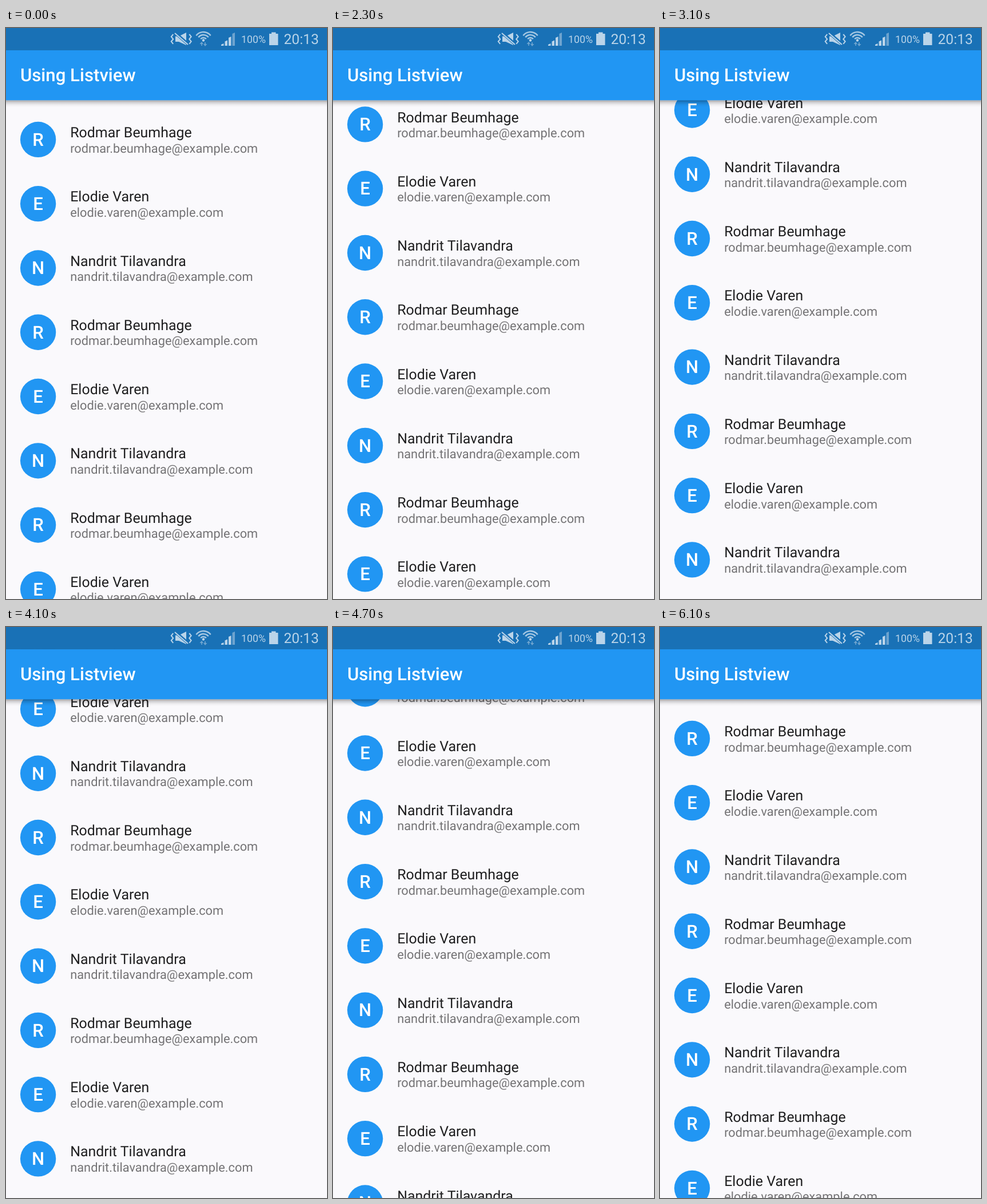
An HTML page with a canvas that plays this animation: 561x998 px, repeating every 6300 ms.

```html
<!DOCTYPE html>
<html lang="en">
<head>
<meta charset="utf-8">
<title>Using Listview</title>
<style>
html, body { margin: 0; width: 100%; height: 100%; overflow: hidden; background: #faf9fc; }
canvas { display: block; }
</style>
</head>
<body>
<canvas id="stage" width="561" height="998"></canvas>
<script>
const W = 561, H = 998, LOOP = 6300, STEP = 100;
// The screen is 360 x 640 dp
const DX = W / 360, DY = H / 640;
const ROW = 72 * DY, FIRST = 125 * DY, BAR_TOP = 25 * DY, BAR_BOTTOM = 81 * DY;
const END = 105 * DY;
const BLUE = '#2196f3', STATUS = '#1971b6', ICON = '#bad4e9', DIM = '#6ea4cf';
const people = ['Rodmar Beumhage', 'Elodie Varen', 'Nandrit Tilavandra'];
const rows = Array.from({ length: 9 }, (_, i) => people[i % people.length]);

// [time, scroll offset], linear in between
const keys = [
  [0, 0], [2200, 0], [2300, 26.5], [2700, 121], [2900, END],
  [4300, END], [4700, 86.7], [5000, 26], [5200, 0], [LOOP, 0]
];

const ctx = document.getElementById('stage').getContext('2d');
ctx.textRendering = 'geometricPrecision';

function scrollAt(t) {
  const i = keys.findIndex(k => k[0] > t);
  const [t0, s0] = keys[i - 1], [t1, s1] = keys[i];
  return s0 + (s1 - s0) * (t - t0) / (t1 - t0);
}

function rect(x, y, w, h, color) {
  ctx.fillStyle = color;
  ctx.fillRect(x, y, w, h);
}

function text(str, x, y, size, color, weight = 400, align = 'left') {
  ctx.font = `${weight} ${size}px Roboto, sans-serif`;
  ctx.textAlign = align;
  ctx.fillStyle = color;
  ctx.fillText(str, x, y);
}

function shape(points, color) {
  ctx.fillStyle = color;
  ctx.beginPath();
  points.forEach(([x, y]) => ctx.lineTo(x, y));
  ctx.fill();
}

function line(points, color, width) {
  ctx.strokeStyle = color;
  ctx.lineWidth = width;
  ctx.beginPath();
  points.forEach(([x, y]) => ctx.lineTo(x, y));
  ctx.stroke();
}

function drawRow(name, y) {
  ctx.fillStyle = BLUE;
  ctx.beginPath();
  ctx.arc(36 * DX, y, 20 * DX, 0, Math.PI * 2);
  ctx.fill();
  text(name[0], 36 * DX, y + 10.8, 20 * DX, '#fff', 500, 'center');
  text(name, 72 * DX, y - 3.9, 16 * DX, '#1f1f20');
  const mail = name.toLowerCase().replace(' ', '.') + '@example.com';
  text(mail, 72 * DX, y + 22.6, 14 * DX, '#747375');
}

function drawMute() {
  shape([[296, 14.5], [302, 14.5], [315, 8], [315, 30], [302, 24], [296, 24]], ICON);
  line([[294, 7], [319, 29]], STATUS, 5);
  line([[295, 9], [318, 29]], ICON, 2);
  for (const [x, side] of [[290.5, 1], [322, -1]]) {
    const zigzag = [0, 1, 2, 3, 4].map(i => [x + (i % 2 ? -1.7 : 1.7) * side, 11 + i * 4.2]);
    line(zigzag, ICON, 2);
  }
}

function drawWifi() {
  ctx.strokeStyle = '#a5c7e2';
  ctx.lineWidth = 2.5;
  for (const r of [6, 11, 16]) {
    ctx.beginPath();
    ctx.arc(345, 23, r, -Math.PI * 0.79, -Math.PI * 0.21);
    ctx.stroke();
  }
  ctx.fillStyle = ICON;
  ctx.beginPath();
  ctx.arc(345, 21.5, 2.2, 0, Math.PI * 2);
  ctx.fill();
  line([[342, 25], [342, 31]], DIM, 1.7);
  line([[348, 25], [348, 31]], DIM, 1.7);
  shape([[338.5, 28], [342, 24], [345, 28]], DIM);
  shape([[345, 28], [348, 32], [351.5, 28]], DIM);
}

function drawStatus() {
  rect(0, 0, W, BAR_TOP, STATUS);
  drawMute();
  drawWifi();
  [27, 21.5, 15, 8].forEach((top, i) => {
    const x = 376 + i * 6.5;
    shape([[x, top + 2], [x + 4.5, top], [x + 4.5, 31], [x, 31]], i < 3 ? ICON : DIM);
  });
  text('100%', 411, 26, 17.8, ICON);
  rect(464, 7.5, 7.5, 3, ICON);
  rect(460, 10, 15.5, 20, ICON);
  text('20:13', 485.5, 28, 24.6, ICON);
}

function drawBar() {
  const shade = ctx.createLinearGradient(0, BAR_BOTTOM, 0, BAR_BOTTOM + 12);
  shade.addColorStop(0, 'rgba(0,0,0,0.34)');
  shade.addColorStop(0.3, 'rgba(0,0,0,0.17)');
  shade.addColorStop(0.65, 'rgba(0,0,0,0.05)');
  shade.addColorStop(1, 'rgba(0,0,0,0)');
  rect(0, BAR_BOTTOM, W, 12, shade);
  rect(0, BAR_TOP, W, BAR_BOTTOM - BAR_TOP, BLUE);
  text('Using Listview', 16 * DX, 93.2, 20 * DX, '#fff', 500);
}

function draw(t) {
  rect(0, 0, W, H, '#faf9fc');
  const offset = scrollAt(t);
  rows.forEach((name, i) => drawRow(name, FIRST + i * ROW - offset));
  drawBar();
  drawStatus();
}

const start = performance.now();
function tick() {
  const t = (performance.now() - start) % LOOP;
  draw(Math.floor(t / STEP) * STEP);
  requestAnimationFrame(tick);
}
tick();
</script>
</body>
</html>
```
